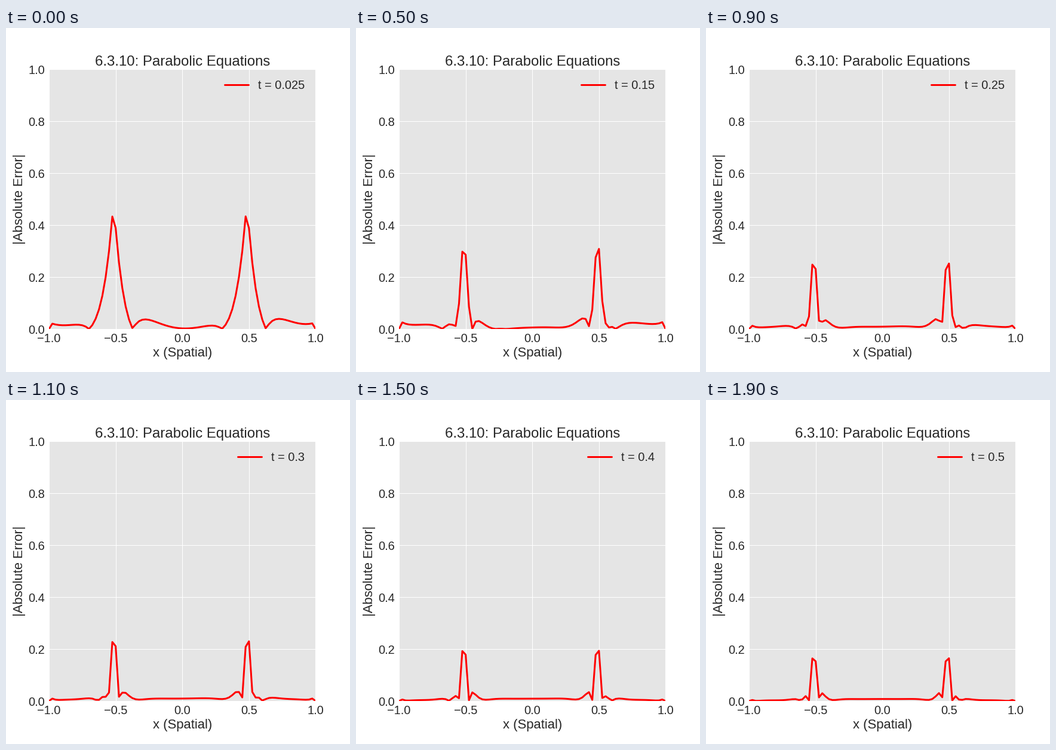
Write a matplotlib script that moves like this. It is 576 px wide and 576 px high and loops after 2000 ms.

```python
import numpy as np
import matplotlib.pyplot as plt
from matplotlib.animation import FuncAnimation

plt.rcParams.update({
    "font.family": "Liberation Sans",
    "text.color": "#262626",
    "axes.labelcolor": "#262626",
    "xtick.color": "#262626",
    "ytick.color": "#262626",
})

H = 1 / 40          # grid spacing
K = 1 / 40          # time step
STEPS = 20
MU = K / H**2

x = np.linspace(-1, 1, 81)


def exact(t):
    """Fourier series of the heat equation with a square-pulse start."""
    n = np.arange(200)[:, None]
    w = np.pi * (2 * n + 1)
    terms = (-1.0) ** n * np.cos(w * x) / w * np.exp(-w**2 * t)
    return 0.5 + 2 * terms.sum(axis=0)


def crank_nicolson():
    """Absolute error after each step; boundary values lag in the solve."""
    size = len(x)
    lap = np.eye(size, k=1) - 2 * np.eye(size) + np.eye(size, k=-1)
    lap[[0, -1]] = 0
    left = np.eye(size) - MU / 2 * lap
    right = np.eye(size) + MU / 2 * lap

    # the pulse covers the grid points from -0.5 up to 0.475
    u = ((x > -0.51) & (x < 0.49)).astype(float)
    errors = []
    for n in range(1, STEPS + 1):
        u = np.linalg.solve(left, right @ u)
        true = exact(n * K)
        u[[0, -1]] = true[[0, -1]]
        errors.append(np.abs(u - true))
    return errors


errors = crank_nicolson()

fig = plt.figure(figsize=(8, 8), dpi=72, facecolor="white")
fig.subplots_adjust(left=0.125, right=0.9, bottom=0.125, top=0.88)
ax = fig.add_subplot(facecolor="#E5E5E5")
ax.set_axisbelow(True)
ax.grid(color="white", linewidth=1)
for spine in ax.spines.values():
    spine.set_visible(False)

ax.set(xlim=(-1, 1), ylim=(0, 1))
ax.set_xticks(np.linspace(-1, 1, 5))
ax.set_yticks(np.linspace(0, 1, 6))
ax.tick_params(length=0, pad=7, labelsize=20)
ax.set_title("6.3.10: Parabolic Equations", fontsize=24, pad=6)
ax.set_xlabel("x (Spatial)", fontsize=22, labelpad=4)
ax.set_ylabel("|Absolute Error|", fontsize=22, labelpad=4)

line, = ax.plot(x, errors[0], color="red", linewidth=3,
                solid_capstyle="round", label="t = 0.025")
legend = ax.legend(loc="upper right", fontsize=20, frameon=False)
label = legend.get_texts()[0]


def update(i):
    line.set_ydata(errors[i])
    label.set_text(f"t = {round((i + 1) * K, 3)}")
    return line, label


anim = FuncAnimation(fig, update, frames=STEPS, interval=100,
                     repeat=True, repeat_delay=0, blit=False)
plt.show()
```
